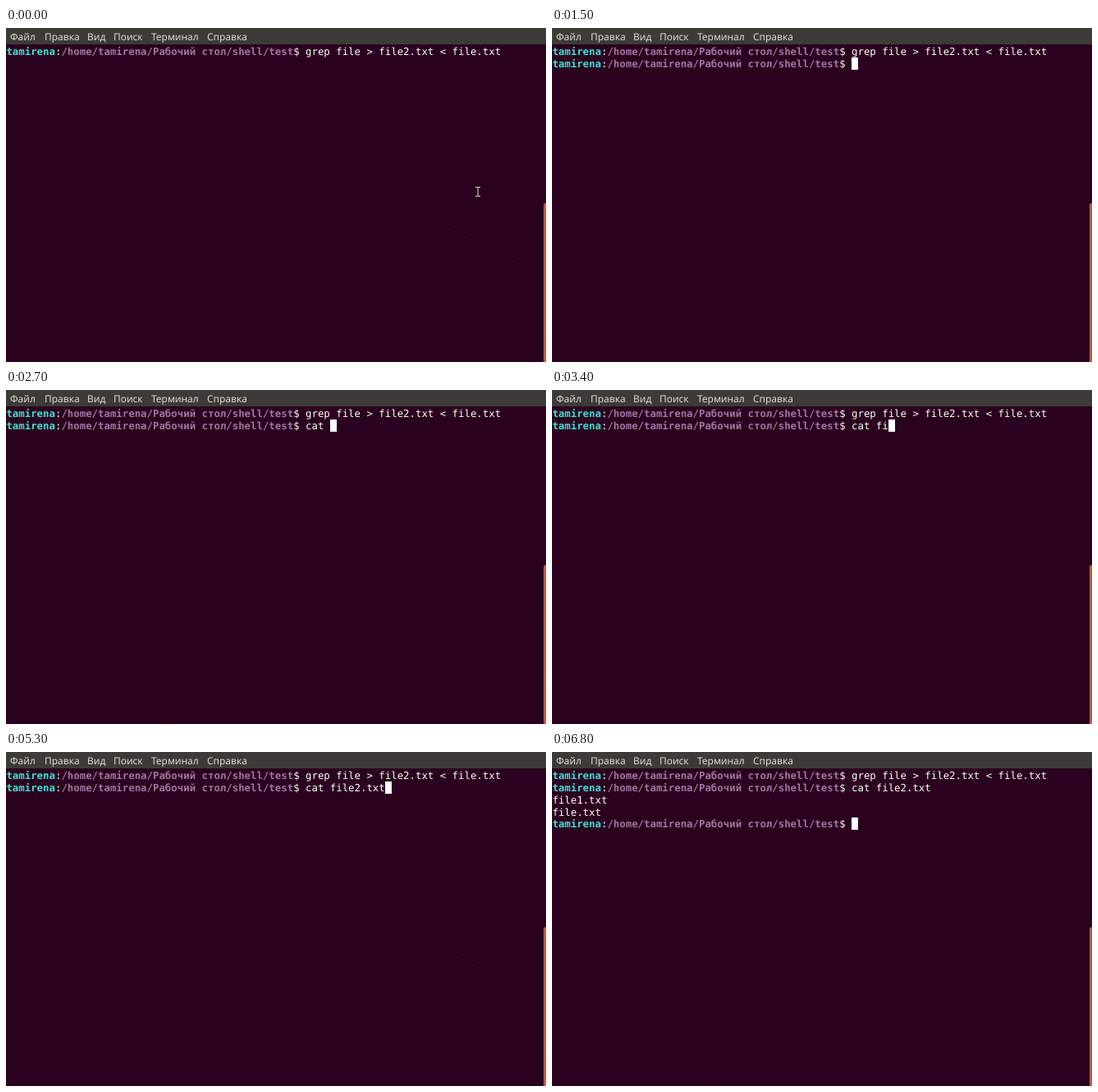
Write an HTML page that moves like this. It is 658 px wide and 408 px high and loops after 6.9 s.

```html
<!DOCTYPE html>
<html lang="ru">
<head>
<meta charset="utf-8">
<title>Терминал</title>
<style>
  html, body { margin: 0; width: 100%; height: 100%; overflow: hidden; background: #2a011e; }
  #stage { position: relative; width: 658px; height: 408px; overflow: hidden; text-rendering: geometricPrecision; }
  svg { position: absolute; inset: 0; }
  .menu { position: absolute; inset: 0 0 auto; height: 20px; background: #3c3b37;
          font: 11.95px/21px "Noto Sans", "Open Sans", sans-serif; color: #dfdbd2; }
  .menu span { position: absolute; top: 0; white-space: nowrap; }
  #term { position: absolute; left: .4px; top: 22px; margin: 0; color: #fff;
          font: 12.36px/14.87px "DejaVu Sans Mono", monospace; }
  #term div { height: 14.87px; white-space: pre; }
  #term b { color: #3de2d4; }
  #term b + b { color: #a375a2; }
  #caret { position: absolute; width: 8px; height: 15px; background: #fff; }
  .bar { position: absolute; left: 654.5px; top: 214px; width: 3.5px; height: 194px;
         background: #c4543f; border-radius: 2px 0 0 0; }
</style>
</head>
<body>
<div id="stage">
  <svg width="658" height="408" fill="none">
    <g stroke="#3a1030" stroke-opacity=".3">
      <path d="M5 217L140 358M14 217L149 358M23 217L158 358M34 217L169 358M46 217L181 358M145 372L182 408M158 372L195 408M170 372L207 408"/>
      <path d="M134.5 373V408M5 361L16 370M577 360L598 371M627 193L635 207"/>
    </g>
    <path d="M485 217L650 301M495 217L655 298M553 217L655 268" stroke="#2c1838" stroke-opacity=".4"/>
    <path id="pointer" d="M572 194.5H574.5L575 195L575.5 194.5H578M575 195V205M572 205.5H574.5L575 205L575.5 205.5H578" stroke="#e8e0e6"/>
  </svg>
  <div class="menu">
    <span style="left:5px">Файл</span>
    <span style="left:47px">Правка</span>
    <span style="left:99px">Вид</span>
    <span style="left:131px">Поиск</span>
    <span style="left:177px">Терминал</span>
    <span style="left:245px">Справка</span>
  </div>
  <div id="term"></div>
  <div class="bar"></div>
</div>
<script>
  const LOOP = 6900, BLINK = 600, ROW = 14.87, COL = 12.36 * 0.602;
  const USER = "tamirena", DIR = `/home/${USER}/Рабочий стол/shell/test`;
  const INDENT = USER.length + DIR.length + 3;
  const FIRST = "grep file > file2.txt < file.txt", SECOND = "cat file2.txt";
  const OUTPUT = ["file1.txt", "file.txt"];
  const ENTER = 1400, RUN = 5600;
  // key press times for SECOND
  const keys = [1800, 1900, 2100, 2600, 3000, 3200, 3500, 3700, 3900, 4200, 4400, 4500, 4800];
  const inputs = [ENTER, ...keys, RUN];

  const term = document.getElementById("term");
  const pointer = document.getElementById("pointer");
  const prompt = cmd => `<div><b>${USER}</b>:<b>${DIR}</b>$ ${cmd.replace(/</g, "&lt;")}</div>`;
  let shown = "";

  function screen(t) {
    const typed = SECOND.slice(0, keys.filter(k => k <= t).length);
    let html = prompt(FIRST), row = 0, col = INDENT + FIRST.length;
    if (t >= ENTER) {
      html += prompt(typed);
      row = 1;
      col = INDENT + typed.length;
    }
    if (t >= RUN) {
      html += OUTPUT.map(s => `<div>${s}</div>`).join("") + prompt("");
      row = 4;
      col = INDENT;
    }
    // each key press restarts the blink with the caret visible
    const last = inputs.filter(k => k <= t).pop() ?? -BLINK;
    if (Math.floor((t - last) / BLINK) % 2 === 0 && t >= BLINK)
      html += `<i id="caret" style="left:${col * COL}px;top:${row * ROW - 1}px"></i>`;
    return html;
  }

  function draw(now) {
    const t = now % LOOP, html = screen(t);
    if (html !== shown) term.innerHTML = shown = html;
    // typing hides the mouse pointer
    pointer.style.visibility = t < ENTER ? "visible" : "hidden";
    requestAnimationFrame(draw);
  }
  draw(performance.now());
</script>
</body>
</html>
```
